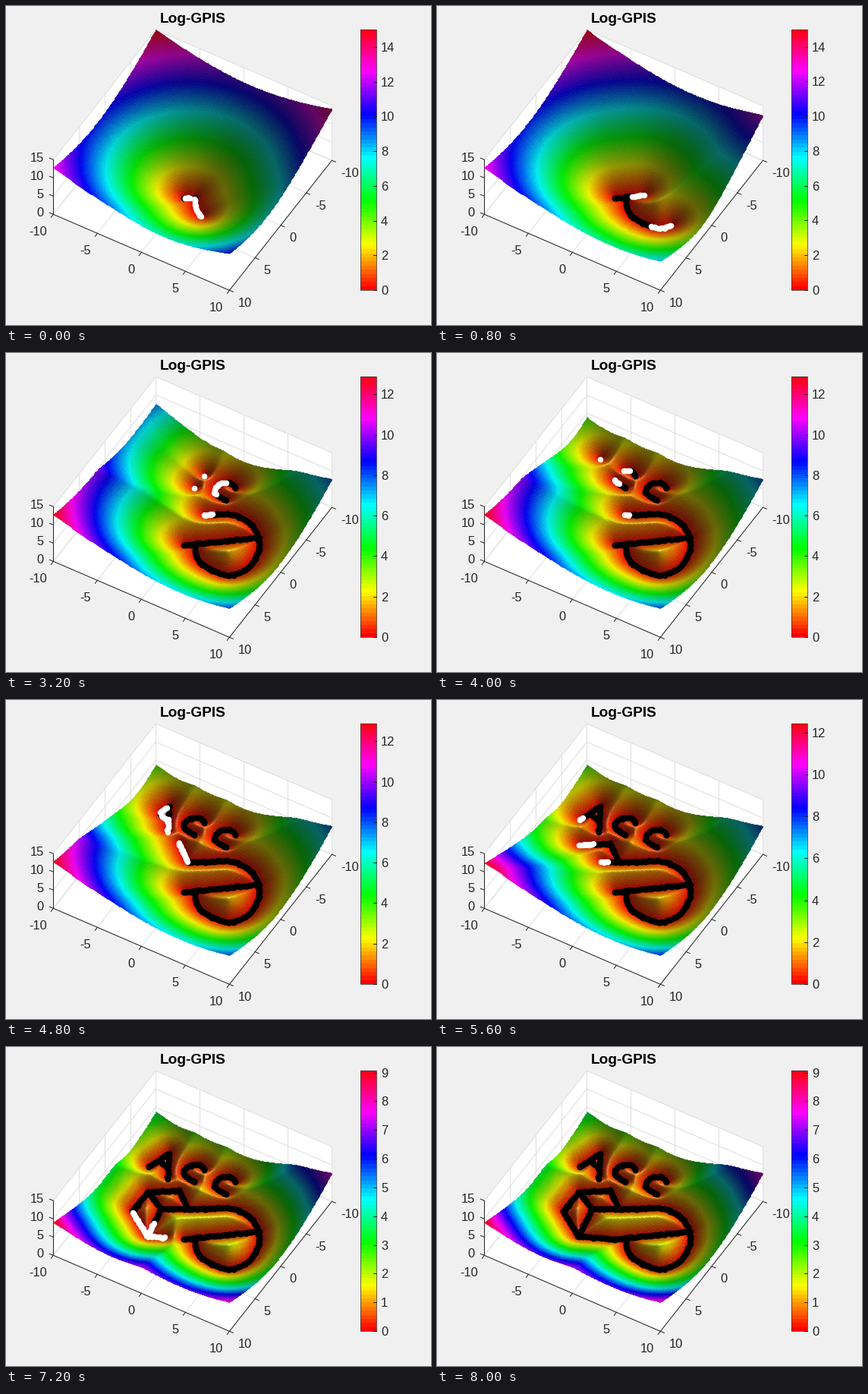
A matplotlib script for the animation above (8400 ms loop, 560 by 420 pixels).

```python
import numpy as np
import matplotlib.pyplot as plt
from matplotlib.animation import FuncAnimation
from matplotlib.colors import hsv_to_rgb
from matplotlib.patches import Polygon, Rectangle

W, H, DPI = 560, 420, 100
PX = 72 / DPI                       # points per pixel
FRAMES, STEP = 21, 400
N = 160                             # surface cells per side
LAM = 8.0                           # sharpness of the soft distance
ZMAX = 15
INK, GRID = "#262626", "#dedede"
LEFT, BASE = 62.4, 274.3            # pixel of the floor corner (-10, 10)
AX, BX, AY, BY, CZ = 11.6, 5.0, 6.75, 8.55, 4.8

plt.rcParams["font.family"] = "Liberation Sans"


def project(x, y, z=0.0):
    u, v = x + 10, 10 - y
    return LEFT + AX * u + AY * v, BASE + BX * u - BY * v - CZ * z


def unproject(px, py):
    a, b = px - LEFT, py - BASE
    det = AX * BY + AY * BX
    return (BY * a + AY * b) / det - 10, 10 - (BX * a - AX * b) / det


def smooth(pts):
    """Hermite curve through a few points, in evenly spaced steps."""
    p = np.array(pts, float)
    m = np.gradient(p, axis=0)
    t = np.linspace(0, len(p) - 1, 40 * len(p))
    i = np.minimum(t.astype(int), len(p) - 2)
    f = (t - i)[:, None]
    q = ((1 + 2 * f) * (1 - f)**2 * p[i] + f * (1 - f)**2 * m[i]
         + f**2 * (3 - 2 * f) * p[i + 1] - f**2 * (1 - f) * m[i + 1])
    run = np.r_[0, np.cumsum(np.hypot(*np.diff(q, axis=0).T))]
    s = np.linspace(0, run[-1], int(run[-1] / 1.6) + 2)
    return np.c_[np.interp(s, run, q[:, 0]), np.interp(s, run, q[:, 1])]


def stroke(t0, t1, *pts, ease=1.0, inward=False):
    """Rows of x, y, length and birth time; inward strokes close from both ends."""
    px, py = smooth(pts).T
    x, y = unproject(px, py)
    ds = np.hypot(np.gradient(x), np.gradient(y))
    s = np.linspace(0, 1, len(px))
    if inward:
        s = 1 - abs(2 * s - 1)
    return np.c_[px, py, x, y, ds, t0 + (t1 - t0) * s ** (1 / ease)]


def letter_c(t0, t1, cx, cy):
    shape = [(13, -6), (5, -13), (-9, -11), (-15, 0), (0, 10)]
    return stroke(t0, t1, *[(cx + x, cy + y) for x, y in shape], inward=True)


start, join, tip = (234, 253), (333, 243), (239, 213)
ridge, corner, inner = (228, 189), (187, 191), (204, 213)
side, foot = (166, 216), (186, 249)
apex, left_leg, right_leg = (215, 140), (188, 158), (213, 173)

dots = np.vstack([
    stroke(-1, 5, start, join, ease=1.35),
    stroke(-1, 4, (248, 252), (255, 275), (289, 292), (317, 284), (332, 262), join),
    stroke(5, 8, join, (322, 225), (298, 213), (261, 213), ease=0.35),
    letter_c(6, 8, 290, 184),
    letter_c(8, 11, 249, 168),
    stroke(8, 11, (261, 213), tip),
    stroke(10, 12, apex, right_leg),
    stroke(10.8, 13.5, apex, left_leg),
    stroke(11, 12, (203, 150), (213, 160)),
    stroke(11, 12, tip, ridge),
    stroke(12, 14, ridge, corner),
    stroke(12, 15, tip, inner),
    stroke(15, 16, inner, corner),
    stroke(15, 17, corner, side),
    stroke(17, 18, side, foot),
    stroke(16, 18, inner, foot),
    stroke(17, 19, foot, start),
])
birth = dots[:, 5]
spots = dots[:, :2] + np.random.default_rng(4).normal(0, 0.4, (len(dots), 2))

axis = np.linspace(-10, 10, N + 1)
GX, GY = np.meshgrid(axis, axis)


def height_fields():
    total, fields = np.zeros_like(GX), []
    for k in range(FRAMES):
        new = (birth <= k) & ((birth > k - 1) | (k == 0))
        for _, _, x, y, ds, _ in dots[new]:
            total += ds * np.exp(-LAM * np.hypot(GX - x, GY - y))
        d = -0.99 * np.log(total * LAM / 2) / LAM
        fields.append(np.clip(d, 0, ZMAX))
    return fields


FIELDS = height_fields()
LIGHT = np.array([0.41, -0.71, 0.57])


def rainbow(v):
    hue = np.clip(np.floor(v * 64), 0, 63) / 64
    one = np.ones_like(hue)
    return hsv_to_rgb(np.stack([hue, one, one], -1))


def cells(a):
    return (a[1:, 1:] + a[:-1, 1:] + a[1:, :-1] + a[:-1, :-1]) / 4


def shaded(z, top):
    zy, zx = np.gradient(z, axis, axis)
    nx, ny = -0.53 * cells(zx), -0.53 * cells(zy)
    size = np.sqrt(nx**2 + ny**2 + 1)
    dot = (nx * LIGHT[0] + ny * LIGHT[1] + LIGHT[2]) / size
    lit = 0.28 + 0.76 * np.clip(dot, 0, 1)
    shine = 0.3 * size ** -40.0     # flat crests catch the light
    return np.clip(rainbow(cells(z) / top) * lit[..., None] + shine[..., None], 0, 1)


fig = plt.figure(figsize=(W / DPI, H / DPI), dpi=DPI, facecolor="#f0f0f0")
ax = fig.add_axes([0, 0, 1, 1])
ax.axis("off")
ax.set_autoscale_on(False)


def line(a, b, color=INK, z=2):
    return ax.plot([a[0], b[0]], [a[1], b[1]], color=color, lw=PX, zorder=z)[0]


def text(x, y, s, ha="left", size=16.5, color=INK, **kw):
    return ax.text(x, y, s, ha=ha, va="center_baseline", fontsize=size * PX,
                   color=color, zorder=6, **kw)


def draw_box():
    rim = [(-10, 10, ZMAX), (-10, -10, ZMAX), (10, -10, ZMAX),
           (10, -10, 0), (10, 10, 0), (-10, 10, 0)]
    ax.add_patch(Polygon([project(*c) for c in rim], fc="white", ec="none", zorder=0))
    for v in range(-10, 11, 5):
        line(project(v, -10), project(v, 10), GRID, 1)
        line(project(-10, v), project(10, v), GRID, 1)
        line(project(v, -10), project(v, -10, ZMAX), GRID, 1)
        line(project(-10, v), project(-10, v, ZMAX), GRID, 1)
    for z in range(0, 16, 5):
        line(project(-10, 10, z), project(-10, -10, z), GRID, 1)
        line(project(-10, -10, z), project(10, -10, z), GRID, 1)

    line(project(-10, 10), project(10, 10))
    line(project(10, 10), project(10, -10))
    line(project(-10, 10), project(-10, 10, ZMAX))
    for v in range(-10, 11, 5):
        x, y = project(v, 10)
        line((x, y), (x - 3, y + 4))
        text(x - 8.5, y + 21.5, str(v), ha="right")
        x, y = project(10, v)
        line((x, y), (x + 5, y + 2))
        text(x + 11.5, y + 15.5, str(v))
    for z in range(0, 16, 5):
        x, y = project(-10, 10, z)
        line((x, y), (x - 5, y - 2))
        text(49.7, y - 3, str(z), ha="right")
    text(246, 15.5, "Log-GPIS", ha="center", size=19.1, color="black", weight="bold")


BAR_L, BAR_R, BAR_T, BAR_B = 467, 488, 31, 374


def draw_bar():
    strip = rainbow((np.arange(64)[:, None] + 0.5) / 64)
    ax.imshow(strip, extent=(BAR_L, BAR_R, BAR_B, BAR_T), origin="lower",
              aspect="auto", interpolation="nearest", zorder=4)
    ax.add_patch(Rectangle((BAR_L, BAR_T), BAR_R - BAR_L, BAR_B - BAR_T,
                           fc="none", ec=INK, lw=0.7 * PX, zorder=5))


draw_box()
draw_bar()
ax.set_xlim(0, W)
ax.set_ylim(H, 0)
black, = ax.plot([], [], "o", ms=7.8 * PX, color="black", mew=0, zorder=4)
white, = ax.plot([], [], "o", ms=7.5 * PX, color="white", mew=0, zorder=5)
parts = []


def update(k):
    while parts:
        parts.pop().remove()
    z = FIELDS[k]
    top = z.max()
    sx, sy = project(GX, GY, z)
    parts.append(ax.pcolormesh(sx, sy, shaded(z, top), shading="flat", zorder=3,
                               edgecolors="face", linewidth=0.5 * PX,
                               antialiased=True))

    for v in range(0, int(top) + 1, 2 if top > 10.9 else 1):
        y = BAR_B - (BAR_B - BAR_T) * v / top
        parts.append(line((BAR_R - 4, y), (BAR_R, y), z=6))
        parts.append(text(494, y, str(v)))

    old = birth <= k - 1
    fresh = (birth <= k) & ~old
    black.set_data(*spots[old].T)
    white.set_data(*spots[fresh].T)
    return [black, white, *parts]


anim = FuncAnimation(fig, update, frames=FRAMES, interval=STEP,
                     repeat=True, repeat_delay=0, blit=False)
plt.show()
```
